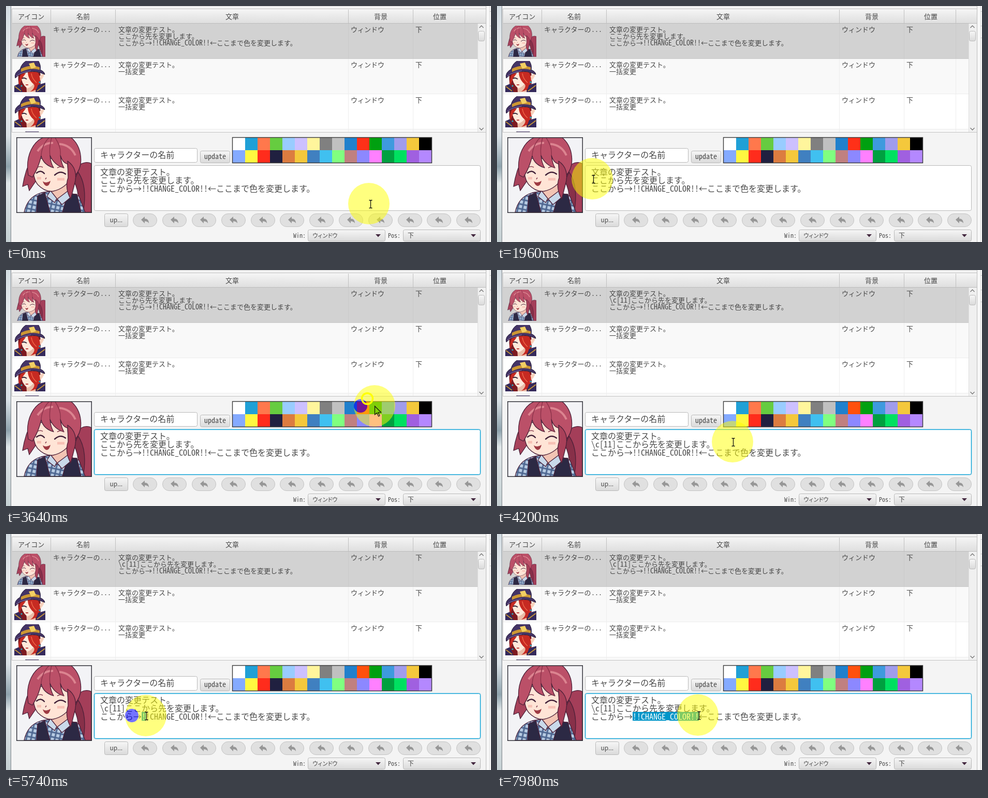
Write an HTML page that moves like this. It is 937 px wide and 455 px high and loops after 8000 ms.

```html
<!DOCTYPE html>
<html lang="ja">
<head>
<meta charset="utf-8">
<style>
html, body { margin: 0; width: 100%; height: 100%; overflow: hidden; background: #f4f4f4; }
svg { display: block; }
text { font-family: "Noto Sans CJK JP Light", "Noto Sans CJK JP", "Noto Sans CJK", sans-serif; font-weight: 300; white-space: pre; }
.half { font-family: "Noto Sans Mono CJK JP", "Noto Sans Mono", monospace; }
</style>
</head>
<body>
<svg id="stage" width="937" height="455" viewBox="0 0 937 455">
<defs>
  <linearGradient id="head" x2="0" y2="1"><stop stop-color="#f5f5f5"/><stop offset="1" stop-color="#dedede"/></linearGradient>
  <linearGradient id="btn" x2="0" y2="1"><stop stop-color="#f6f6f6"/><stop offset="1" stop-color="#dadada"/></linearGradient>
  <linearGradient id="desk" x2="0" y2="1"><stop stop-color="#d3dce2"/><stop offset=".25" stop-color="#eef1f3"/><stop offset=".55" stop-color="#d9e1e6"/><stop offset=".68" stop-color="#8fa3ad"/><stop offset=".75" stop-color="#dfe6e8"/><stop offset="1" stop-color="#c5d0d3"/></linearGradient>
  <pattern id="check" width="9" height="9" patternUnits="userSpaceOnUse" patternTransform="rotate(12)">
    <path fill="#b9cde4" d="M0 0h9v9h-9z"/><path stroke="#4d6690" stroke-width="3" d="M2 0v9M0 3h9"/>
  </pattern>
  <symbol id="girl" viewBox="0 0 144 144">
    <g stroke="#4c2038" stroke-width="1.3" stroke-linejoin="round">
      <path fill="#a43e59" d="M108 62Q130 42 144 50V144H116Q130 112 110 84Z"/>
      <path fill="#883049" d="M118 66Q137 92 128 144H117Q123 106 110 84Z"/>
      <path fill="#a8425b" d="M30 36Q16 62 11 94L21 90L24 102L39 80L42 50Z"/>
      <path fill="#f2c4b4" d="M66 91L66 121L88 131L98 115V85Z"/>
      <path fill="url(#check)" d="M14 144Q20 114 47 106L65 103L76 121L98 104L120 113L132 144Z"/>
      <path fill="#2c2944" d="M38 144L40 112L54 106L64 144ZM88 144L98 108L116 109L124 144Z"/>
      <path fill="#c9d9ea" d="M65 102L58 113L73 125L77 117ZM98 103L105 114L87 129L78 118Z"/>
      <path fill="#ffe4d6" d="M33 40Q28 74 40 90Q54 105 70 103Q94 98 105 76L106 40Z"/>
      <path fill="#bb5068" d="M22 72C16 36 30 2 62 -4H100C118 8 126 28 123 52Q119 70 106 78Q98 68 98 51Q88 48 84 34Q86 50 91 58Q72 53 64 34Q65 48 71 58Q51 52 47 35Q42 58 30 76Z"/>
      <path fill="#a94059" d="M98 45Q120 60 111 91L104 118Q92 97 99 77Z"/>
    </g>
    <path fill="none" stroke="#dc8490" stroke-width="4" d="M40 26Q52 9 70 10M82 12Q104 14 113 34"/>
    <path fill="none" stroke="#8f344c" stroke-width="1.5" d="M62 0Q48 14 47 35M67 0Q62 20 64 34M74 0Q86 18 84 34"/>
    <path fill="none" stroke="#ef9f96" stroke-width="5" opacity=".5" d="M39 78h8M78 80h14"/>
    <path fill="none" stroke="#43233a" stroke-width="2.4" stroke-linecap="round" d="M38 68Q46 61 53 69M73 72Q84 62 94 70"/>
    <path fill="none" stroke="#884254" stroke-width="1.6" d="M40 57Q45 54 50 57M78 58Q85 54 91 58M57 77l-2 3"/>
    <path fill="#9e3b43" d="M50 84Q57 89 65 83Q63 93 57 93Q52 91 50 84Z"/>
  </symbol>
  <symbol id="witch" viewBox="0 0 60 60">
    <path fill="#7d1a20" d="M8 24Q6 46 14 60H46Q54 42 50 22Z"/>
    <path fill="#f7d2bd" d="M44 32L59 22Q56 37 45 41Z"/>
    <path fill="#eabda8" d="M23 44H38L42 60H24Z"/>
    <path fill="#ffe9da" d="M13 27Q13 43 25 53Q40 48 46 24L30 20Z"/>
    <path fill="#c62a22" d="M14 23Q7 36 9 50Q12 36 22 24ZM26 20Q26 36 39 46Q39 54 31 59Q46 56 49 44Q52 33 45 21Z"/>
    <path fill="none" stroke="#f0694a" stroke-width="1.5" d="M33 24Q34 34 43 42"/>
    <path fill="none" stroke="#302034" stroke-width="1.8" d="M15 34Q19 31 24 35"/>
    <path stroke="#b33" stroke-width="1.8" d="M22 46h5"/>
    <path fill="#352a5c" d="M0 48L9 44L16 60H0ZM41 60L46 46L60 42V60Z"/>
    <path fill="#443466" stroke="#211934" d="M11 16Q15 3 25 -1H46Q52 8 50 17Q58 20 59 26Q42 18 27 21Q10 24 2 33Q-1 23 11 16Z"/>
    <path fill="#cd9733" d="M13 15Q31 6 49 12V17Q31 12 13 21Z"/>
    <path fill="#f2cf63" d="M28 5L38 3L42 12L33 15Z"/>
    <path fill="none" stroke="#9577b1" d="M4 29Q16 21 32 19"/>
    <circle cx="14" cy="48" r="1.6" fill="#28aec4"/><circle cx="49" cy="41" r="1.8" fill="#28aec4"/>
    <path stroke="#c99837" stroke-width="1.6" d="M1 49L13 58M44 58L59 47"/>
  </symbol>
  <clipPath id="list"><path d="M12 34H911V243H12Z"/></clipPath>
  <clipPath id="selClip"><rect id="selArea" x="262" y="343" height="17" width="0"/></clipPath>
</defs>
</svg>
<script>
const stage = document.getElementById('stage');
const INK = '#484848';

const rect = (x, y, w, h, fill, more = '') =>
  `<rect x="${x}" y="${y}" width="${w}" height="${h}" fill="${fill}" ${more}/>`;
const path = (d, fill, more = '') => `<path d="${d}" fill="${fill}" ${more}/>`;
const line = (d, color) => path(d, 'none', `stroke="${color}" shape-rendering="crispEdges"`);
const use = (id, x, y, s) => `<use href="#${id}" x="${x}" y="${y}" width="${s}" height="${s}"/>`;
const box = (x, y, w, h, fill, r = 3, color = '#b9b9b9') =>
  rect(x + .5, y + .5, w - 1, h - 1, fill, `rx="${r}" stroke="${color}"`);

// Fullwidth runs advance one em per character; ASCII uses an even size so each half em is whole.
function label(str, x, y, size, fill = INK) {
  return str.match(/[\x20-\x7e]+|[^\x20-\x7e]+/g).map(run => {
    const half = run.charCodeAt(0) < 127;
    const em = half ? 2 * Math.ceil(size / 2) : size;
    const out = `<text class="${half ? 'half' : ''}" x="${x}" y="${y}" font-size="${em}" fill="${fill}">${run}</text>`;
    x += run.length * em * (half ? .5 : 1);
    return out;
  }).join('');
}

const lines = (list, x, y, size, step) =>
  list.map((s, i) => label(s, x, y + i * step, size)).join('');

const FIRST = '文章の変更テスト。';
const PLAIN = 'ここから先を変更します。';
const CODED = '\\c[11]' + PLAIN;
const LAST = 'ここから→!!CHANGE_COLOR!!←ここまで色を変更します。';
const COLUMNS = [86, 211, 661, 786, 886];

function table() {
  let s = rect(11, 6, 916, 28, 'url(#head)') + line('M11 5.5H927M11 33.5H927', '#bdbdbd');
  s += line(COLUMNS.map(x => `M${x}.5 7V33`).join(''), '#c0c0c0');
  [['アイコン', 23], ['名前', 136], ['文章', 424], ['背景', 711], ['位置', 825]]
    .forEach(([t, x]) => s += label(t, x, 25, 13));
  s += '<g clip-path="url(#list)">';
  ['#d2d2d2', '#f9f9f9', '#fff', '#f9f9f9'].forEach((fill, i) => {
    const y = 34 + i * 68;
    s += rect(12, y, 899, 68, fill) + line(`M12 ${y + 67.5}H911`, i ? '#ececec' : '#c9c9c9');
    s += use(i ? 'witch' : 'girl', 16, y + 4, 60);
    if (i > 2) return;
    s += label('キャラクターの...', 91, y + 16, 13);
    s += label('ウィンドウ', 666, y + 16, 13) + label('下', 791, y + 16, 13);
    s += i ? lines([FIRST, '一括変更'], 217, y + 16, 13, 13)
           : label(FIRST, 217, 50, 13) + label(LAST, 217, 76, 13);
  });
  s += line(COLUMNS.map(x => `M${x}.5 34V101`).join(''), '#cbcbcb');
  s += line(COLUMNS.map(x => `M${x}.5 102V243`).join(''), '#ededed');
  s += '</g>' + rect(911, 34, 16, 209, '#f0f0f0') + line('M911.5 34V243', '#dedede');
  s += box(912, 48, 13, 20, 'url(#btn)');
  s += path('M914.5 42L918.5 38L922.5 42M914.5 235L918.5 239L922.5 235', 'none', 'stroke="#777" stroke-width="1.3"');
  return s + line('M11 243.5H927', '#c4c4c4') + line('M11.5 5V243', '#c4c4c4');
}

const PALETTE = ('fff 20a0d6 ff784c 66cc40 99ccff ccc0ff fff59c 808080 c0c0c0 2080cc ff3018 00a010 3e9ade a09cec f4c83c 000 ' +
  '84aaff fff840 ff2c1c 202040 dc7c40 f4c83c 4080c0 40c0f0 80ff80 c08080 8c88ff ff80ff 00a040 00e060 a060e0 b488ff').split(' ');

function palette() {
  const cells = PALETTE.map((c, i) => rect(438 + i % 16 * 24, 254 + (i >> 4) * 24, 24, 24, '#' + c, `id="c${i}"`));
  return cells.join('') + rect(437.5, 253.5, 385, 49, 'none', 'stroke="#3a3a3a" stroke-width="1.4"');
}

function combo(x, caption, size, spacing) {
  return box(x, 431, 150, 23, 'url(#btn)') +
    `<g letter-spacing="${spacing}">${label(caption, x + 9, 447, size)}</g>` +
    path(`M${x + 131} 440h10l-5 5.5z`, '#43283f');
}

function pill(x) {
  return box(x, 400, 47, 26, '#e0e0e0', 12.5, '#c4c4c4') +
    path(`M${x + 16} 412l7-6v4c5 0 8 3 8 9c-2-3-4-4-8-4v4z`, '#979797');
}

function panel() {
  let s = rect(20.5, 253.5, 145, 145, '#f3f3f6') + use('girl', 21, 254, 144) +
    rect(20.75, 253.75, 144.5, 144.5, 'none', 'stroke="#35353c" stroke-width="1.5"');
  s += box(170, 274, 200, 28, '#fff') + label('キャラクターの名前', 182, 293, 16);
  s += box(375, 279, 58, 24, 'url(#btn)') + label('update', 383, 295, 13);
  s += palette() + box(170, 307, 747, 88, '#fff');
  s += `<g id="focus">${rect(169.5, 306.5, 748, 89, 'none', 'rx="4" stroke="#c4e4f0"')}
    ${rect(171.5, 308.5, 744, 85, 'none', 'rx="2" stroke="#c4e9f6"')}
    ${rect(170.5, 307.5, 746, 87, 'none', 'rx="3" stroke="#039ed3"')}</g>`;
  s += box(190, 400, 46, 26, 'url(#btn)') + `<text x="200.5" y="417" font-size="12" fill="${INK}">up...</text>`;
  for (let i = 0; i < 12; i++) s += pill(Math.round(245.3 + i * 56.8));
  s += label('Win:', 555, 447, 12) + combo(583, 'ウィンドウ', 11, -1.5);
  return s + label('Pos:', 738, 447, 12) + combo(767, '下', 12, 0);
}

function edges() {
  return rect(0, 0, 937, 455, '#f4f4f4') + rect(0, 0, 9, 455, 'url(#desk)') +
    line('M9.5 0V455', '#7c8288') + line('M64 .5H927', '#d4d4d4') +
    rect(928, 0, 9, 455, '#f7f7f7') + line('M927.5 0V455', '#bcbcbc') +
    line('M934.5 0V455', '#dcdcdc') + line('M934 10.5H937M934 38.5H937M934 61.5H937', '#c8c8c8');
}

const secondLine = (id, s) => `<g id="${id}">${label(s, 217, 63, 13)}${label(s, 182, 342, 16)}</g>`;

const HALO = 'M-40 0a40 40 0 1 0 80 0a40 40 0 1 0 -80 0z';
const HOLE = 'M-40 0a13 13 0 1 0 26 0a13 13 0 1 0 -26 0z';

stage.insertAdjacentHTML('beforeend', edges() + table() + panel() +
  label(FIRST, 182, 326, 16) + secondLine('plain', PLAIN) + secondLine('coded', CODED) +
  label(LAST, 182, 358, 16) +
  `<g clip-path="url(#selClip)">${rect(262, 343, 200, 17, '#0096c9')}${label(LAST, 182, 358, 16, '#fff')}</g>
  <g id="pointer">
    <path id="halo" fill="#ff0" fill-opacity=".5" fill-rule="evenodd"/>
    <path id="press" d="${HOLE}" fill="#00f" fill-opacity=".55"/>
    <circle id="ring" cx="-14" cy="-14" r="10.5" fill="none" stroke="#ff0" stroke-width="3.5"/>
    <path id="beam" d="M-3 -7.5H-1L0 -6.5L1 -7.5H3M0 -6.5V6.5M-3 7.5H-1L0 6.5L1 7.5H3" fill="none" stroke="#111" stroke-width="1.3"/>
    <path id="arrow" d="M.5 .5V17L4.5 13.5L7.5 20L10 19L7 12.5H12.5Z" fill="none" stroke="#111" stroke-width="1.2"/>
  </g>`);

// time, x, y, offset of the text cursor from the highlight
const MOVES = [
  [0, 701, 381, 3], [280, 690, 382], [420, 608, 382], [560, 482, 381], [700, 374, 380], [840, 295, 378, 0],
  [980, 250, 361], [1120, 222, 339], [1260, 210, 325], [1400, 198, 328], [1540, 190, 331], [1680, 185, 333],
  [1820, 184, 333, 2], [2380, 220, 305],
  [2520, 318, 294], [2660, 440, 283], [2800, 552, 273], [2940, 632, 266], [3080, 681, 263], [3220, 703, 262],
  [3360, 711, 262], [3500, 714, 262], [3640, 712, 262],
  [3780, 715, 264], [3920, 684, 275], [4060, 585, 301], [4200, 455, 331], [4340, 360, 347], [4480, 318, 351],
  [4760, 304, 349, 0], [4900, 288, 350], [5040, 273, 350], [5180, 264, 350], [5320, 261, 350],
  [5600, 262, 350], [5740, 270, 350], [5880, 287, 350], [6020, 311, 350], [6160, 338, 350], [6300, 364, 349],
  [6440, 388, 349, 9], [6580, 406, 350], [6720, 411, 350], [7000, 388, 349, 9], [7980, 388, 349, 2]
];
const PRESSES = [[2100, 2240], [3640, 3780], [5600, 7980]];
const STEP = 140, LOOP = 8000;

const el = id => document.getElementById(id);
const show = (id, on) => el(id).style.display = on ? '' : 'none';

function selectionWidth(t, x) {
  if (t < 5600) return 0;
  return x < 390 ? 8 * Math.round((x - 262) / 8) : 128 + 16 * Math.round((x - 390) / 16);
}

function draw(t) {
  const [, x, y, dx = 1] = MOVES.findLast(m => m[0] <= t);
  const press = PRESSES.find(([a, b]) => t >= a && t < b);
  const overText = x > 170 && (y > 306 || (x < 370 && y > 273 && y < 303));
  el('pointer').setAttribute('transform', `translate(${x} ${y})`);
  el('halo').setAttribute('d', press ? HALO + HOLE : HALO);
  el('beam').setAttribute('transform', `translate(${dx + .5} 1)`);
  show('beam', overText);
  show('arrow', !overText);
  show('press', press);
  show('ring', press && t < press[0] + STEP);
  show('focus', t >= 2100);
  show('plain', t < 3780);
  show('coded', t >= 3780);
  el('c10').setAttribute('fill', t < 3780 ? '#ff3018' : '#ff500c');
  el('selArea').setAttribute('width', selectionWidth(t, x));
}

const start = performance.now();
function tick(now) {
  draw(Math.max(0, now - start) % LOOP);
  requestAnimationFrame(tick);
}
draw(0);
requestAnimationFrame(tick);
</script>
</body>
</html>
```
